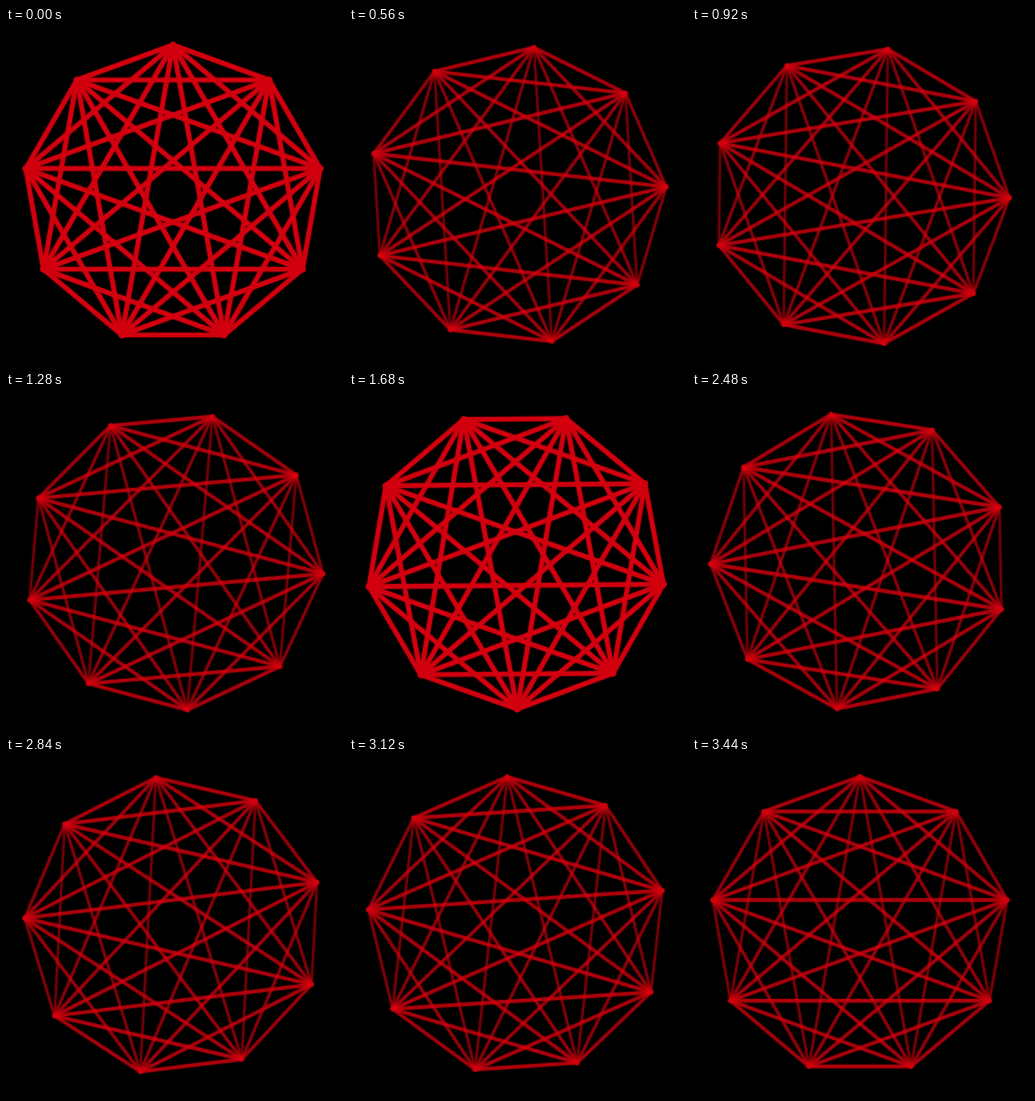
Write an HTML page with a canvas that moves like this. It is 337x337 px and loops after 3480 ms.

```html
<!DOCTYPE html>
<html lang="en">
<head>
<meta charset="utf-8">
<title>Rotating nonagon</title>
<style>
html, body { margin: 0; width: 100%; height: 100%; overflow: hidden; background: #000; }
canvas { display: block; width: 337px; height: 337px; }
</style>
</head>
<body>
<canvas id="stage" width="337" height="337"></canvas>
<script>
const ctx = document.getElementById('stage').getContext('2d');
const SIZE = 337, POINTS = 9, RADIUS = 149.5;
const LOOP = 3480, STEP = 40;
const SECTOR = 2 * Math.PI / POINTS;

const mix = (a, b, k) => a + (b - a) * k;

function smooth(from, to, x) {
  const k = Math.min(1, Math.max(0, (x - from) / (to - from)));
  return k * k * (3 - 2 * k);
}

// 1 while the strokes are bold, 0 while they are fine
function boldness(time) {
  return 1 - smooth(280, 540, Math.min(time, Math.abs(time - 1940)));
}

function strokeLine(a, b, width, alpha) {
  ctx.globalAlpha = alpha;
  ctx.lineWidth = width;
  ctx.beginPath();
  ctx.moveTo(a.x, a.y);
  ctx.lineTo(b.x, b.y);
  ctx.stroke();
}

function drawChord(a, b, bold) {
  // Fine strokes fade as they get steeper
  const flat = Math.abs(b.x - a.x) / Math.hypot(b.x - a.x, b.y - a.y);
  const width = mix(2.3 + 1.1 * flat, 4.6, bold);
  const alpha = mix(0.46 + 0.32 * flat, 1, bold);
  strokeLine(a, b, width + 2, alpha * 0.25);
  strokeLine(a, b, width, alpha);
}

function draw(time) {
  const bold = boldness(time);
  const turn = SECTOR * time / (LOOP - STEP);
  const cx = mix(168, 167, bold), cy = mix(168, 166.5, bold);
  const corners = Array.from({ length: POINTS }, (_, i) => {
    const angle = turn + i * SECTOR;
    return { x: cx + RADIUS * Math.sin(angle), y: cy - RADIUS * Math.cos(angle) };
  });

  ctx.globalAlpha = 1;
  ctx.fillStyle = '#000';
  ctx.fillRect(0, 0, SIZE, SIZE);
  ctx.strokeStyle = '#d2000f';
  ctx.lineCap = 'round';
  corners.forEach((a, i) => {
    for (const b of corners.slice(i + 1)) drawChord(a, b, bold);
  });
}

const start = performance.now();

function tick() {
  const elapsed = (performance.now() - start) % LOOP;
  draw(Math.floor(elapsed / STEP) * STEP);
  requestAnimationFrame(tick);
}
tick();
</script>
</body>
</html>
```
